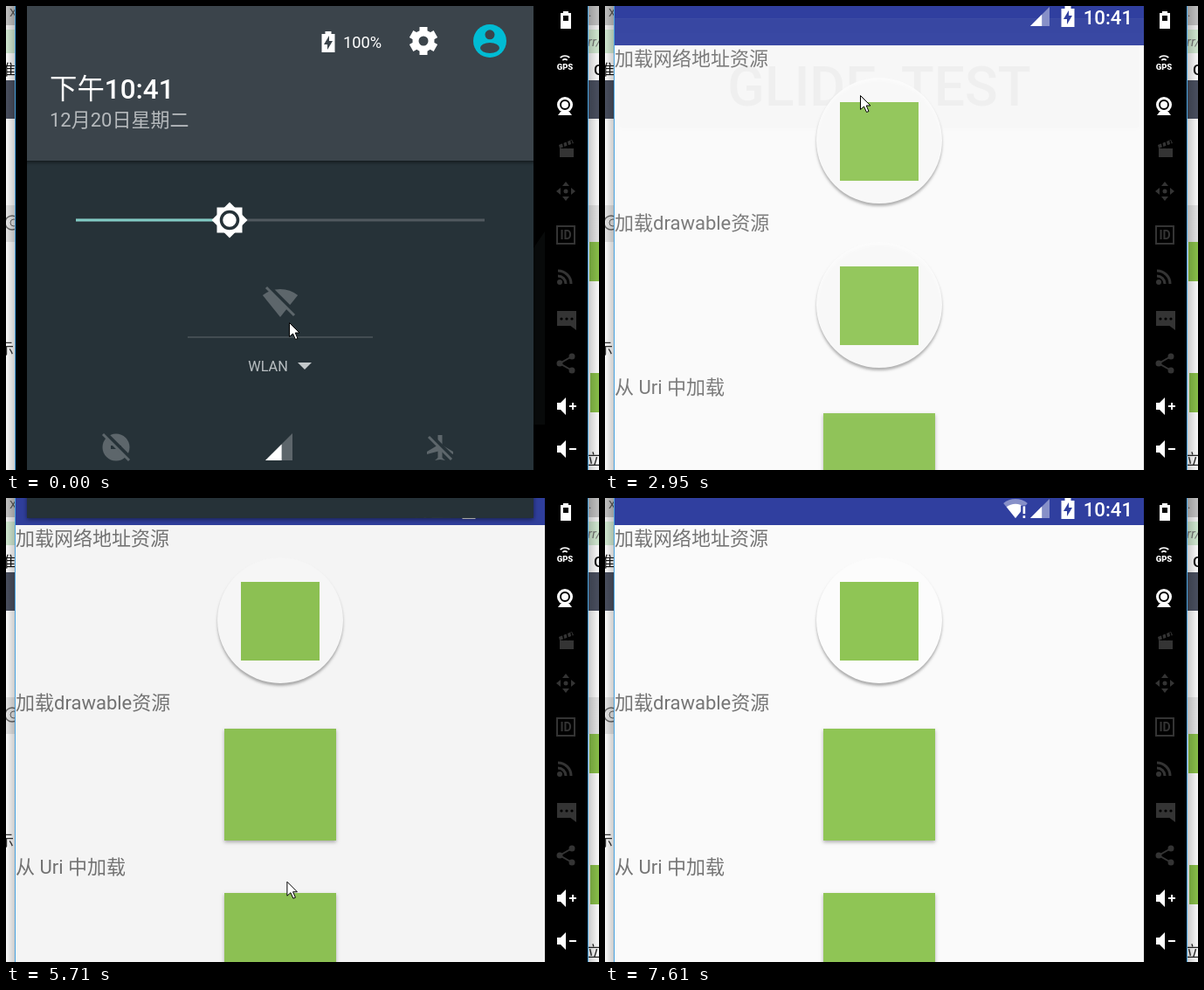
An HTML page with a canvas for the animation above (8 s loop, 679 by 531 pixels).

```html
<!DOCTYPE html>
<html lang="zh-CN">
<head>
<meta charset="utf-8">
<style>
html, body { margin: 0; width: 100%; height: 100%; overflow: hidden; background: #fff; }
canvas { display: block; }
</style>
</head>
<body>
<canvas id="stage" width="679" height="531"></canvas>
<script>
const W = 679, H = 531, LOOP = 8000, STEP = 132, PHASE = 46, TAU = Math.PI * 2;
const g = document.getElementById('stage').getContext('2d');
const WHITE = '#fff', PANEL = '#3b444b', BODY = '#263238', GREY = '#5d666b', GREEN = '#8fc555', OFF = '#343434';
const BLUE = '#303f9f', PALE = '#8790c8';

const clamp = v => Math.max(0, Math.min(1, v));
const mix = (a, b, k) => a + (b - a) * k;
const ramp = (t, from, to) => clamp((t - from) / (to - from));

// Time, x and y of the places where the pointer turns or rests.
const stops = [[0, 324, 362], [1160, 322, 446], [2010, 322, 446], [2150, 292, 102], [3070, 292, 102],
  [4010, 440, 489], [4666, 367, 410], [5280, 335, 312], [5850, 310, 545], [6200, 310, 545], [6510, 276, 205],
  [6640, 276, 205], [6900, 262, -30], [LOOP, 262, -30]];

function pointerAt(t) {
  const i = stops.findIndex(s => s[0] > t), a = stops[i - 1], b = stops[i];
  const k = ramp(t, a[0], b[0]);
  return [mix(a[1], b[1], k), mix(a[2], b[2], k)];
}

// Lower edge of the pull-down shade: open, absent, pulled down, pushed up in two strokes.
function shadeBottom(t) {
  if (t < 2010) return 620;
  return 620 * ramp(t, 5580, 5850) - 495 * ramp(t, 6200, 6510) - 125 * ramp(t, 6640, 6890);
}

function rect(color, x, y, w, h) {
  g.fillStyle = color;
  g.fillRect(x, y, w, h);
}
function circle(color, x, y, r) {
  g.fillStyle = color;
  g.beginPath();
  g.arc(x, y, r, 0, TAU);
  g.fill();
}
function poly(color, ...pts) {
  g.fillStyle = color;
  g.beginPath();
  for (let i = 0; i < pts.length; i += 2) g.lineTo(pts[i], pts[i + 1]);
  g.closePath();
  g.fill();
}
function line(color, width, ...pts) {
  g.strokeStyle = color;
  g.lineWidth = width;
  g.beginPath();
  for (let i = 0; i < pts.length; i += 2) g.lineTo(pts[i], pts[i + 1]);
  g.stroke();
}
function arc(color, width, x, y, r, from = 0, to = TAU) {
  g.strokeStyle = color;
  g.lineWidth = width;
  g.beginPath();
  g.arc(x, y, r, from, to);
  g.stroke();
}
function text(s, x, y, size, color, weight = 400, align = 'left') {
  g.font = `${weight} ${size}px Roboto, "Noto Sans CJK SC", "Noto Sans CJK", sans-serif`;
  g.textAlign = align;
  g.fillStyle = color;
  g.fillText(s, x, y);
}
function at(x, y, draw, alpha = 1) {
  g.save();
  g.globalAlpha *= alpha;
  g.translate(x, y);
  draw();
  g.restore();
}
function spin(count, turn, draw) {
  for (let i = 0; i < count; i++) {
    draw();
    g.rotate(turn);
  }
}
function raised(blur, dy, alpha, draw) {
  g.save();
  g.shadowColor = `rgba(0,0,0,${alpha})`;
  g.shadowBlur = blur;
  g.shadowOffsetY = dy;
  draw();
  g.restore();
}
function clipped(x, y, w, h, draw) {
  g.save();
  g.beginPath();
  g.rect(x, y, w, h);
  g.clip();
  draw();
  g.restore();
}

function battery(x, y, bolt) {
  at(x, y, () => {
    rect(WHITE, -3.5, -12, 7, 4);
    rect(WHITE, -7.5, -9, 15, 21);
    poly(bolt, 1, -7, -5, 3, -1, 3, -1, 9, 5, -1, 1, -1);
  });
}
function fan(color, x, y, r) {
  g.fillStyle = color;
  g.beginPath();
  g.moveTo(x, y);
  g.arc(x, y, r, -TAU / 4 - 0.68, -TAU / 4 + 0.68);
  g.fill();
}
function weakWifi(x, y, r, pale, back) {
  fan(pale, x, y, r);
  fan(WHITE, x, y, r * 0.74);
  rect(back, x + r * 0.28, y - r * 0.66, r * 0.34, r * 0.7);
  rect(WHITE, x + r * 0.39, y - r * 0.62, r * 0.12, r * 0.4);
  rect(WHITE, x + r * 0.39, y - r * 0.13, r * 0.12, r * 0.13);
}
function signal(x, y, s, pale) {
  poly(pale, x, y, x + s, y, x + s, y - s);
  poly(WHITE, x, y, x + s * 0.6, y, x + s * 0.6, y - s * 0.6);
}
function slash(x, y, r) {
  line(BODY, 6, x - r + 2, y - r - 1, x + r + 2, y + r - 1);
  line(GREY, 3, x - r, y - r, x + r, y + r);
}

function edgeShade(from, to) {
  const fade = g.createLinearGradient(from, 0, to, 0);
  fade.addColorStop(0, 'rgba(0,0,0,.2)');
  fade.addColorStop(1, 'rgba(0,0,0,.02)');
  rect(fade, Math.min(from, to), 0, Math.abs(to - from), H);
}

function browser(t) {
  rect(WHITE, 0, 0, W, H);
  rect('#c4c4c4', 0, 0, W, 22);
  rect('#f4f4f4', 0, 22, W, 5);
  rect('#d4ecd4', 0, 27, W, 27);
  rect('#4a5060', 0, 85, W, 44);
  rect('#e8e8e8', 0, 228, W, 42);
  text('X', 4, 12, 13, '#555');
  text('准', -6, 79, 17, '#111');
  arc('#666', 1.5, 7, 248, 8);
  arc('#666', 1, 9, 248, 4);
  text('示', -8, 398, 17, '#333');
  text('.', 667, 12, 13, '#555');
  text('rr/', 666, 46, 15, '#777', 'italic 400');
  text('G', 673, 79, 17, '#111', 500);
  text('立符', 664, 525, 17, '#222');
  if (t < 1700 || t > 2280) rect('#8bc34a', 668, 270, 11, 45);
  rect('#8bc34a', 669, 420, 10, 45);
  edgeShade(10, 0);
  edgeShade(667, 679);
}

function speaker() {
  poly(WHITE, -10, -4, -6, -4, 0, -10, 0, 10, -6, 4, -10, 4);
  rect(WHITE, 4, -1, 8, 2);
}

// Top to bottom; each one is drawn around its own centre.
const tools = [
  () => {
    rect(WHITE, -3, -10, 6, 3);
    rect(WHITE, -6, -8, 12, 18);
    rect('#000', -3, -5, 6, 6);
  },
  () => {
    text('GPS', -1, 8, 9.5, WHITE, 900, 'center');
    for (const r of [4, 8]) arc(WHITE, 1.7, -1, 0, r, -2.3, -0.85);
  },
  () => {
    circle(WHITE, -1, -1, 9);
    arc('#000', 2, -1, -1, 5);
    poly(WHITE, -9, 11, -6, 7, 4, 7, 7, 11);
  },
  () => {
    rect(OFF, -7, 0, 16, 10);
    poly(OFF, -8, -4, 7, -10, 9, -6, -7, 0);
    for (let x = -4; x < 8; x += 5) line('#000', 1.5, x, -9, x + 2, 0);
  },
  () => {
    circle(OFF, 0, 0, 2.5);
    spin(4, TAU / 4, () => poly(OFF, -4, -6, 4, -6, 0, -11));
  },
  () => {
    line(OFF, 2, -10, -10, 10, -10, 10, 10, -10, 10, -10, -11);
    text('ID', 0, 5, 14, OFF, 700, 'center');
  },
  () => {
    circle(OFF, -7, 5, 3);
    for (const r of [9, 15]) arc(OFF, 3, -9, 7, r, -TAU / 4, 0);
  },
  () => {
    rect(OFF, -10, -11, 22, 17);
    poly(OFF, 4, 5, 12, 5, 12, 11);
    for (let x = -5; x < 8; x += 6) circle('#000', x, -2, 1.6);
  },
  () => {
    line(OFF, 2, 7, -8, -7, 0, 7, 8);
    circle(OFF, -7, 0, 3.5);
    for (const y of [-8, 8]) circle(OFF, 7, y, 3.5);
  },
  () => {
    speaker();
    rect(WHITE, 7, -4, 2, 8);
  },
  speaker
];

function sidebar() {
  rect('#000', 617, 0, 49, H);
  tools.forEach((tool, i) => at(641, Math.round(16 + i * 49.1), tool));
}

function disc(y) {
  raised(3, 3, 0.3, () => circle('#fcfcfc', 314, y, 72));
  rect(GREEN, 269, y - 44, 90, 90);
}
function bigSquare(y) {
  raised(4, 2, 0.3, () => rect(GREEN, 250, y, 128, 128));
}

function blankPage() {
  rect('#fafafa', 11, 0, 606, H);
  rect(BLUE, 11, 0, 606, 31);
}

function buttonPage(t, x, y) {
  blankPage();
  raised(4, 1, 0.4, () => rect('#d6d7d7', 17, 40, 594, 98));
  const press = ramp(t, 2280, 2680);
  clipped(17, 40, 594, 98, () => circle('rgba(0,0,0,.1)', x, y, press * 340));
  text('GLIDE_TEST', 314, 114, 62.5, '#1c1d1d', 500, 'center');
}

function imagePage(t) {
  blankPage();
  ['加载网络地址资源', '加载drawable资源', '从 Uri 中加载'].forEach((s, i) => text(s, 11, 54 + i * 188, 22, '#757575'));
  const loaded = ramp(t, 3200, 3500);
  disc(140);
  at(0, 0, () => disc(328), 1 - loaded);
  at(0, 0, () => bigSquare(264), loaded);
  bigSquare(452);
}

function statusIcons(wifi) {
  if (wifi) weakWifi(470, 23, 22, PALE, BLUE);
  signal(487, 23, 22, PALE);
  battery(530, 12, BLUE);
  text('10:41', 604, 21, 22.2, WHITE, 500, 'right');
}

function gear() {
  spin(3, TAU / 6, () => rect(WHITE, -4.5, -16, 9, 32));
  circle(WHITE, 0, 0, 12.5);
  circle(PANEL, 0, 0, 5.5);
}

function avatar(x, r) {
  circle('#00bcd4', x, 40, r);
  circle(PANEL, x, 40 - r * 0.38, r * 0.29);
  g.beginPath();
  g.ellipse(x, 40 + r * 0.42, r * 0.58, r * 0.32, 0, 0, TAU);
  g.fill();
}

function plane() {
  line(GREY, 5, 0, -15, 0, 12);
  for (const side of [-1, 1]) {
    poly(GREY, 0, -5, 15 * side, 4, 15 * side, 7, 0, 3);
    poly(GREY, 0, 9, 6 * side, 14, 0, 13);
  }
  slash(0, 0, 13);
}

function quickSettings(wifi) {
  line('#51595f', 3, 80, 245, 548, 245);
  line('#80cbc4', 3, 80, 245, 256, 245);
  at(256, 245, () => {
    spin(2, TAU / 8, () => rect(WHITE, -14.5, -14.5, 29, 29));
    arc(BODY, 3.5, 0, 0, 9.5);
  });

  if (wifi) {
    weakWifi(314, 356, 32, GREY, BODY);
    for (const side of [-1, 1]) at(344, 344, () => poly('#a8adaf', -4, 2 * side, 4, 2 * side, 0, 10 * side));
  } else {
    fan(GREY, 314, 356, 32);
    slash(314, 338, 16);
  }
  line('#4c565b', 1.5, 208, 379, 420, 379);
  text(wifi ? 'WiredSSID' : 'WLAN', 300, 418, 16.3, '#b8bec1', 400, 'center');
  at(wifi ? 350 : 334, 408, () => poly('#c3c8ca', 0, 0, 16, 0, 8, 8));

  circle(GREY, 126, 505, 15.5);
  rect(BODY, 120, 503, 12, 4);
  slash(126, 505, 15);
  signal(297, 520, 31, GREY);
  at(497, 506, plane);
}

function shade(bottom, wifi) {
  rect(`rgba(0,0,0,${Math.min(0.6, bottom * 0.00105)})`, 11, 0, 606, H);
  const open = ramp(bottom, 125, 525), wide = open > 0.5;
  const head = mix(91, 177, open), base = Math.max(125, bottom);
  at(0, Math.min(0, bottom - 125), () => {
    raised(5, 2, 0.5, () => rect(BODY, 24, -5, 580, base + 5));
    clipped(24, 0, 580, base, () => {
      at(0, head - 177, () => quickSettings(wifi));
      raised(4, 2, 0.5, () => rect(PANEL, 20, -5, 588, head + 5));
      const size = mix(22, 31.4, open), y = mix(36, 106, open);
      text('下午', 50, y, size, WHITE);
      text('10:41', 50 + size * 2, y, size, WHITE, 500);
      text('12月20日星期二', 50, mix(68, 138, open), 22, '#b6babd');
      battery(wide ? 369 : 511, 41, PANEL);
      avatar(mix(557, 554, open), mix(17.5, 19, open));
      if (wide) {
        text('100%', 386, 48, 18.3, WHITE);
        at(478, 40, gear);
      } else {
        weakWifi(479, 53, 21, '#8b9195', PANEL);
      }
    });
  });
}

function pointer(x, y) {
  at(x + 0.5, y + 0.5, () => {
    poly(WHITE, 0, 0, 0, 16, 4, 12.5, 7, 19, 9.5, 18, 6.7, 11.5, 11.5, 11.5);
    g.strokeStyle = '#000';
    g.lineWidth = 1;
    g.stroke();
  });
}

function phone(t, x, y) {
  const wifi = t > 5280, bottom = shadeBottom(t);
  if (t < 2010) {
    rect('#000', 11, 0, 606, H);
    poly('#151918', 604, 277, 617, 258, 617, 479, 604, 479);
  } else {
    const enter = ramp(t, 2700, 3070), rest = 1 - enter;
    if (rest) buttonPage(t, x, y);
    if (enter) at(0, 85 * rest ** 1.6, () => imagePage(t), 1 - rest ** 2.7);
    statusIcons(wifi);
  }
  if (bottom > 0) shade(bottom, wifi);
}

function draw(t) {
  const [x, y] = pointerAt(t);
  browser(t);
  clipped(11, 0, 606, H, () => phone(t, x, y));
  sidebar();
  const edge = t > 2010 && t < 2430 ? '#a9a9a9' : '#4aa3e0';
  for (const side of [10, 666]) rect(edge, side, 0, 1, H);
  pointer(x, y);
}

function frame() {
  const now = performance.now() % LOOP;
  draw(Math.max(0, Math.floor((now - PHASE) / STEP) * STEP + PHASE));
  requestAnimationFrame(frame);
}
frame();
</script>
</body>
</html>
```
